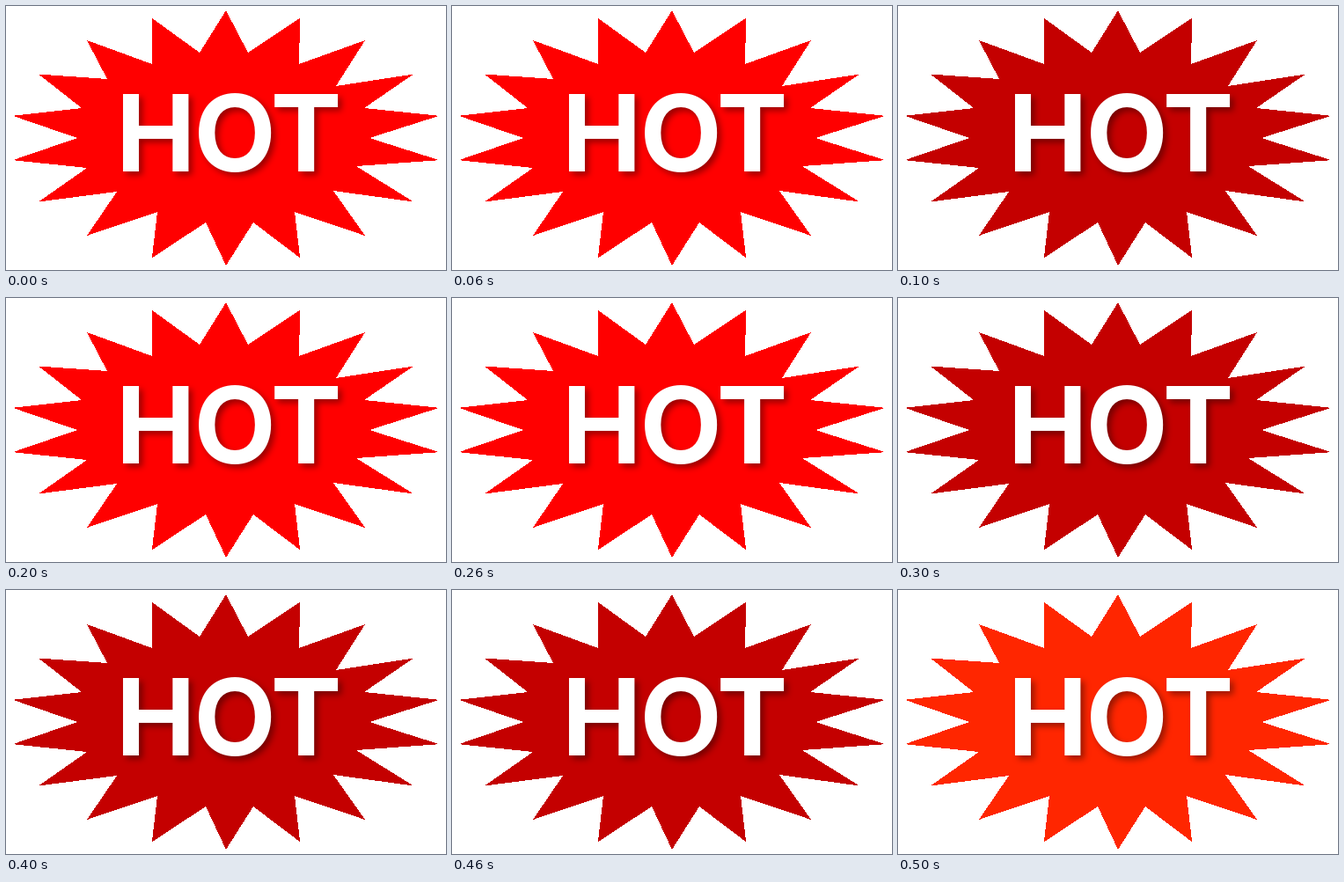
Recreate the animation shown at these times as an HTML page. Size 500 by 300 pixels, loop 600 ms.

```html
<!DOCTYPE html>
<html lang="en">
<head>
<meta charset="utf-8">
<style>
  html, body { margin: 0; width: 100%; height: 100%; overflow: hidden; background: #fff; }
  svg { display: block; width: 500px; height: 300px; }
  text {
    font: bold 121px Inter, Arial, sans-serif;
    letter-spacing: -2px;
    fill: #fff;
    text-shadow: 4px 4px 7px rgba(0, 0, 0, .4);
  }
</style>
</head>
<body>
<svg viewBox="0 0 500 300">
  <polygon id="burst" shape-rendering="crispEdges"/>
  <text x="125" y="188">HOT</text>
</svg>
<script>
  const STEP = 100;
  const RED = '#ff0000', DARK = '#c40000', ORANGE = '#ff2600';
  const COLORS = [RED, DARK, RED, DARK, DARK, ORANGE];

  // Hand-drawn inner corners, clockwise from the top spike.
  const NOTCHES = [
    [275, 53], [333, 66], [375, 91], [407, 116], [413, 150], [398, 182],
    [372, 210], [328, 234], [281, 246], [227, 246], [172, 234], [126, 211],
    [92, 184], [81, 150], [86, 116], [115, 83], [166, 66], [220, 53]
  ];
  const burst = document.getElementById('burst');

  function spike(i) {
    const a = i * 2 * Math.PI / NOTCHES.length;
    return [250 + 246 * Math.sin(a), 150 - 145 * Math.cos(a)];
  }

  function draw(ms) {
    burst.setAttribute('fill', COLORS[Math.floor(ms / STEP) % COLORS.length]);
  }

  const start = performance.now();
  function tick() {
    draw(performance.now() - start);
    requestAnimationFrame(tick);
  }

  burst.setAttribute('points', NOTCHES.flatMap((notch, i) => [spike(i), notch]).join(' '));
  draw(0);
  requestAnimationFrame(tick);
</script>
</body>
</html>
```
